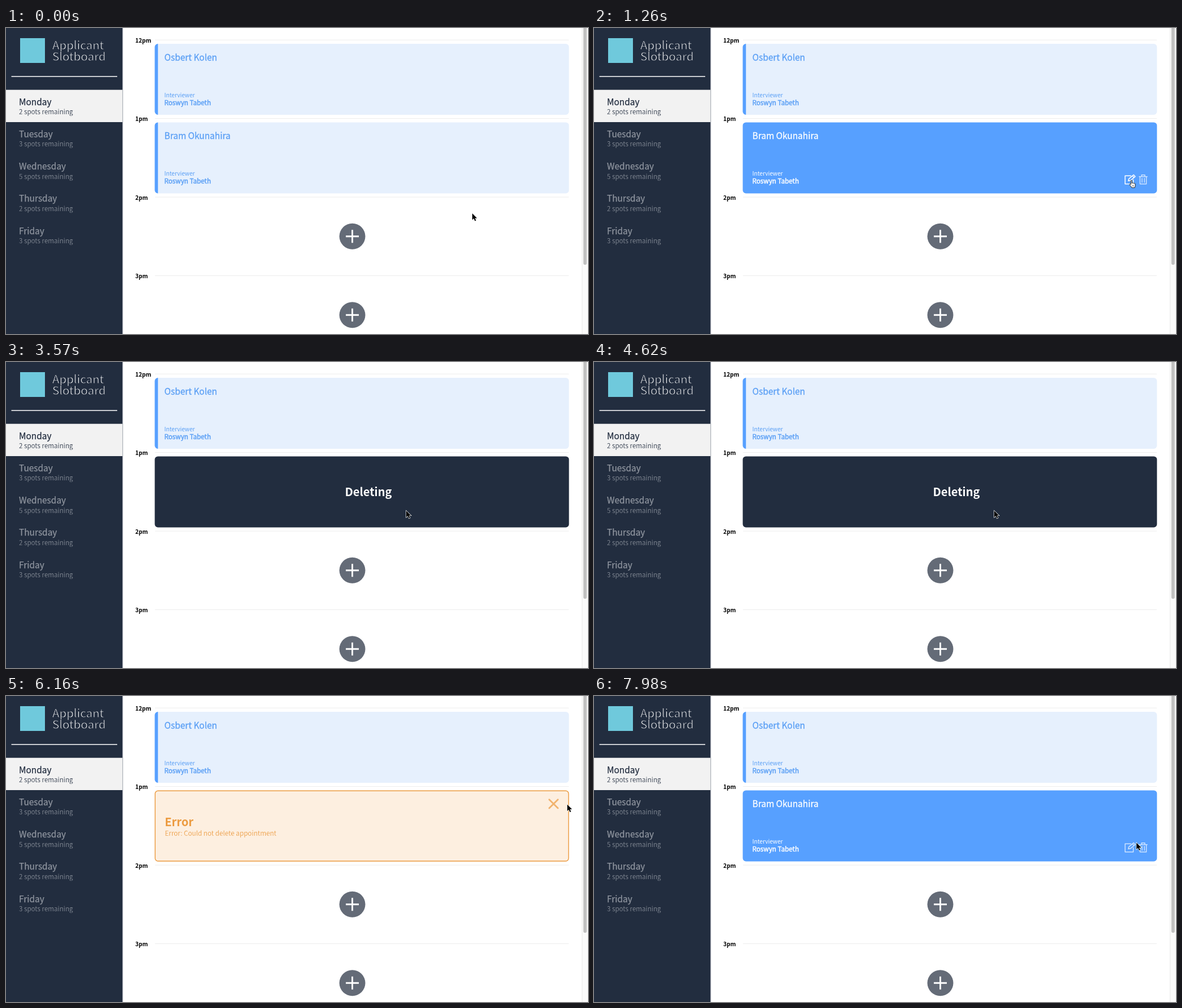
Animation of 1031x543 px, one loop 8 s. Source, as an HTML page:

```html
<!DOCTYPE html>
<html lang="en">
<head>
<meta charset="utf-8">
<title>Appointments</title>
<style>
html, body { margin: 0; width: 100%; height: 100%; overflow: hidden; background: #fff; }
svg { display: block; width: 100%; height: 100%; }
text { font-family: "Noto Sans CJK JP", "Noto Sans CJK SC", "Noto Sans CJK", "Open Sans", sans-serif; white-space: pre; }
</style>
</head>
<body>
<svg id="stage" viewBox="0 0 1031 543" preserveAspectRatio="none"></svg>
<script>
const LOOP = 8000, ROW = 139.4;
const NAVY = '#222d3f', BLUE = '#57a0ff', RED = '#de4c53', ORANGE = '#ec9b40';

// The wanted face is drawn about 11.5% larger per em in Noto Sans CJK.
const text = (x, y, s, size, fill, more = '') =>
  `<text x="${x}" y="${y}" font-size="${(size / 1.115).toFixed(2)}" fill="${fill}" ${more}>${s}</text>`;
const rect = (x, y, w, h, fill, more = '') =>
  `<rect x="${x}" y="${y}" width="${w}" height="${h}" fill="${fill}" ${more}/>`;
const group = (id, body) => `<g id="${id}">${body}</g>`;

// In-between weights: an outline in the text colour thickens, one in the ground colour thins.
const outline = (color, width) => `stroke="${color}" stroke-width="${width}"`;
const BOLD = 'font-weight="700"', MIDDLE = 'text-anchor="middle"';

function sidebar() {
  const days = [['Monday', 2], ['Tuesday', 3], ['Wednesday', 5], ['Thursday', 2], ['Friday', 3]];
  const items = days.map(([day, n], i) => {
    const y = i * 57.3, c = i ? '#8f959f' : NAVY, ground = i ? NAVY : '#f2f2f2';
    return text(23, 136.5 + y, day, 17.2, c, outline(c, 0.25)) +
      text(23, 153 + y, n + ' spots remaining', 12.9, c, outline(ground, 0.2));
  }).join('');
  return rect(206, 0, 1.5, 543, '#c9ccd1') + rect(0, 0, 206.3, 543, NAVY) +
    rect(25, 18, 44, 44, '#6fc9dc') +
    text(82, 38, 'Applicant', 22.9, '#fff', outline(NAVY, 0.8)) +
    text(82, 58, 'Slotboard', 22.9, '#fff', outline(NAVY, 0.8)) +
    rect(9.5, 85.3, 187.5, 1.5, '#fff') +
    rect(0, 109.7, 206.3, 57.3, '#f2f2f2') + items;
}

function rows() {
  return ['12pm', '1pm', '2pm', '3pm'].map((s, i) => {
    const y = i * ROW;
    return text(229, 26 + y, s, 11.3, '#000', BOLD) + rect(264, 20.8 + y, 733, 0.9, '#ebebeb');
  }).join('');
}

const plus = y => `<circle cx="613.5" cy="${y}" r="23" fill="#646b77"/>
  <path d="M602 ${y}h23M613.5 ${y - 11.5}v23" stroke="#fff" stroke-width="2.9"/>`;

function booking(name, y, fill) {
  return text(280.5, y + 29.8, name, 17.2, fill, outline(fill, 0.3)) +
    text(280.5, y + 94.6, 'Interviewer', 11.3, fill) +
    text(280.5, y + 109, 'Roswyn Tabeth', 13, fill, outline(fill, 0.45));
}

const panel = (y, fill) => rect(263.5, y, 733.8, 126, fill, 'rx="5.7"');
const framed = (fill, edge) =>
  rect(264.2, 168.2, 732.4, 124.7, fill, `rx="5" ${outline(edge, 1.45)}`);
const quiet = (name, y) => panel(y, '#e6f0fd') +
  `<path d="M269.2 ${y}v126a5.7 5.7 0 0 1-5.7-5.7v-114.6a5.7 5.7 0 0 1 5.7-5.7z" fill="${BLUE}"/>` +
  booking(name, y, '#5a9ff5');

const pill = (x, s) =>
  rect(x, 256.7, 90.6, 21.6, 'none', `rx="10.8" ${outline(RED, 1.45)}`) +
  text(x + 45.3, 273.2, s, 17.2, RED, MIDDLE);

const icons = `<g fill="none" stroke="#fff" stroke-width="1.5" stroke-linejoin="round" stroke-linecap="round">
  <path id="edit" d="M951 262.3h-10.2v14.4h14.6v-7.2M946.6 271.3l.9-3.7 8.4-7 2.8 3-8.2 7zM953.8 262.3l2.8 3"/>
  <path id="trash" d="M965.8 263.7h14.2M970 263.5v-2.8h5.8v2.8M967.3 263.9v12.9h11.2v-12.9M970.8 266.7v7.2M975 266.7v7.2"/></g>`;

const arrow = `<path d="M0 0v11.5l2.7-2.4 2 4.4 2-.9-2-4.2h3.7z" fill="#000" stroke="#fff" stroke-width="1.3" paint-order="stroke"/>`;
const hand = `<path d="M-1 .8c0-1.4 2-1.4 2 0v4.1c.4-.9 2-.8 2 .2.5-.7 2-.5 2 .5.5-.5 1.8-.3 1.8.8v2.7c0 1.6-.8 2-.8 3.7h-5.6c-.5-2-2.6-3.6-3.6-5.3-.6-1.1.8-1.8 1.5-1l.7.9z" fill="#fff" stroke="#111" stroke-width=".9"/>
  <path d="M2 8.2v2.6M3.7 8.2v2.6" stroke="#111" stroke-width=".6"/>`;

document.getElementById('stage').innerHTML =
  rect(0, 0, 1031, 543, '#fff') + rows() + sidebar() + plus(369.7) + plus(509.2) +
  quiet('Osbert Kolen', 28) +
  rect(1020, 0, 11, 543, '#fafafa') + rect(1020, 0, 0.8, 543, '#e6e6e6') +
  rect(1022.8, -10, 6, 430.3, '#c1c1c1', 'id="thumb" rx="3"') +
  group('idle', quiet('Bram Okunahira', 167.4)) +
  group('hover', panel(167.4, BLUE) + booking('Bram Okunahira', 167.4, '#fff') + icons) +
  group('confirm', framed('#f9e3e5', RED) +
    text(630.5, 203.7, 'Are you sure you want to delete?', 22.4, RED, BOLD + MIDDLE) +
    pill(533.9, 'Cancel') + pill(636.9, 'Confirm')) +
  group('deleting', panel(167.4, NAVY) + text(642, 238, 'Deleting', 22.4, '#fff', BOLD + MIDDLE)) +
  group('error', framed('#fdefe0', ORANGE) + text(281.2, 231, 'Error', 22.4, ORANGE, BOLD) +
    text(281.5, 248, 'Error: Could not delete appointment', 13, ORANGE, outline('#fdefe0', 0.15)) +
    `<path id="close" d="M962.3 183.7l15.4 15.4m0-15.4l-15.4 15.4" ${outline(ORANGE, 2.8)} stroke-linecap="round"/>`) +
  `<circle id="ring" r="22.3" fill="none" stroke="#000" stroke-width="2"/>` +
  group('cursor', group('arrow', arrow) + group('hand', hand));

const el = {};
document.querySelectorAll('[id]').forEach(e => el[e.id] = e);
const show = (id, on) => el[id].setAttribute('display', on ? 'inline' : 'none');
const fade = (id, on) => el[id].setAttribute('opacity', on ? 1 : 0.7);

// time, x, y of the pointer tip
const PATH = [
  [0, 826, 329], [630, 900, 262], [770, 902, 262], [1260, 952, 270.5],
  [1680, 952, 270.5], [2100, 971, 268], [2240, 970, 266], [2730, 970, 266],
  [3010, 707.5, 264], [3500, 707.5, 264], [3570, 709, 264], [5110, 709, 264],
  [5250, 540, 230], [5390, 351, 259], [5530, 333, 250], [5670, 333, 250],
  [6230, 1024, 190], [6370, 1024, 190], [6720, 979, 197], [7280, 979, 197], [7980, 961, 260.5]
];
const RINGS = [[2100, 2240], [3360, 3570], [6790, 6930]];
const inside = (p, x0, y0, x1, y1) => p[0] >= x0 && p[0] <= x1 && p[1] >= y0 && p[1] <= y1;

function pointer(t) {
  const i = PATH.findIndex(k => k[0] > t);
  if (i < 0) return PATH[PATH.length - 1].slice(1);
  const [a, b] = [PATH[i - 1], PATH[i]];
  const u = (t - a[0]) / (b[0] - a[0]), e = u * u * (3 - 2 * u);
  return [a[1] + (b[1] - a[1]) * e, a[2] + (b[2] - a[2]) * e];
}

function stateAt(t, p) {
  if (t >= 2240 && t < 3570) return 'confirm';
  if (t >= 3570 && t < 4830) return 'deleting';
  if (t >= 4830 && t < 6930) return 'error';
  return inside(p, 264, 167, 997, 293) ? 'hover' : 'idle';
}

function draw(time) {
  const t = Math.floor((time % LOOP) / 70) * 70;
  const p = pointer(t), state = stateAt(t, p);
  ['idle', 'hover', 'confirm', 'deleting', 'error'].forEach(s => show(s, s === state));

  const onEdit = state === 'hover' && inside(p, 940, 262, 959.5, 278);
  const onTrash = state === 'hover' && inside(p, 964, 261, 981, 278);
  const onClose = state === 'error' && inside(p, 960, 181, 981, 201);
  const onButton = state === 'confirm' &&
    (inside(p, 637, 256, 728, 279) || inside(p, 534, 256, 625, 279));
  fade('edit', onEdit);
  fade('trash', onTrash);
  fade('close', onClose);

  const pointing = onEdit || onTrash || onClose || onButton;
  show('hand', pointing);
  show('arrow', !pointing);
  const at = `translate(${p[0].toFixed(1)} ${p[1].toFixed(1)})`;
  el.cursor.setAttribute('transform', at);
  el.ring.setAttribute('transform', at);
  show('ring', RINGS.some(r => t >= r[0] && t < r[1]));
  el.thumb.setAttribute('fill', p[0] > 1020 ? '#7d7d7d' : '#c1c1c1');
}

const start = performance.now();
function tick() {
  draw(performance.now() - start);
  requestAnimationFrame(tick);
}
tick();
</script>
</body>
</html>
```
